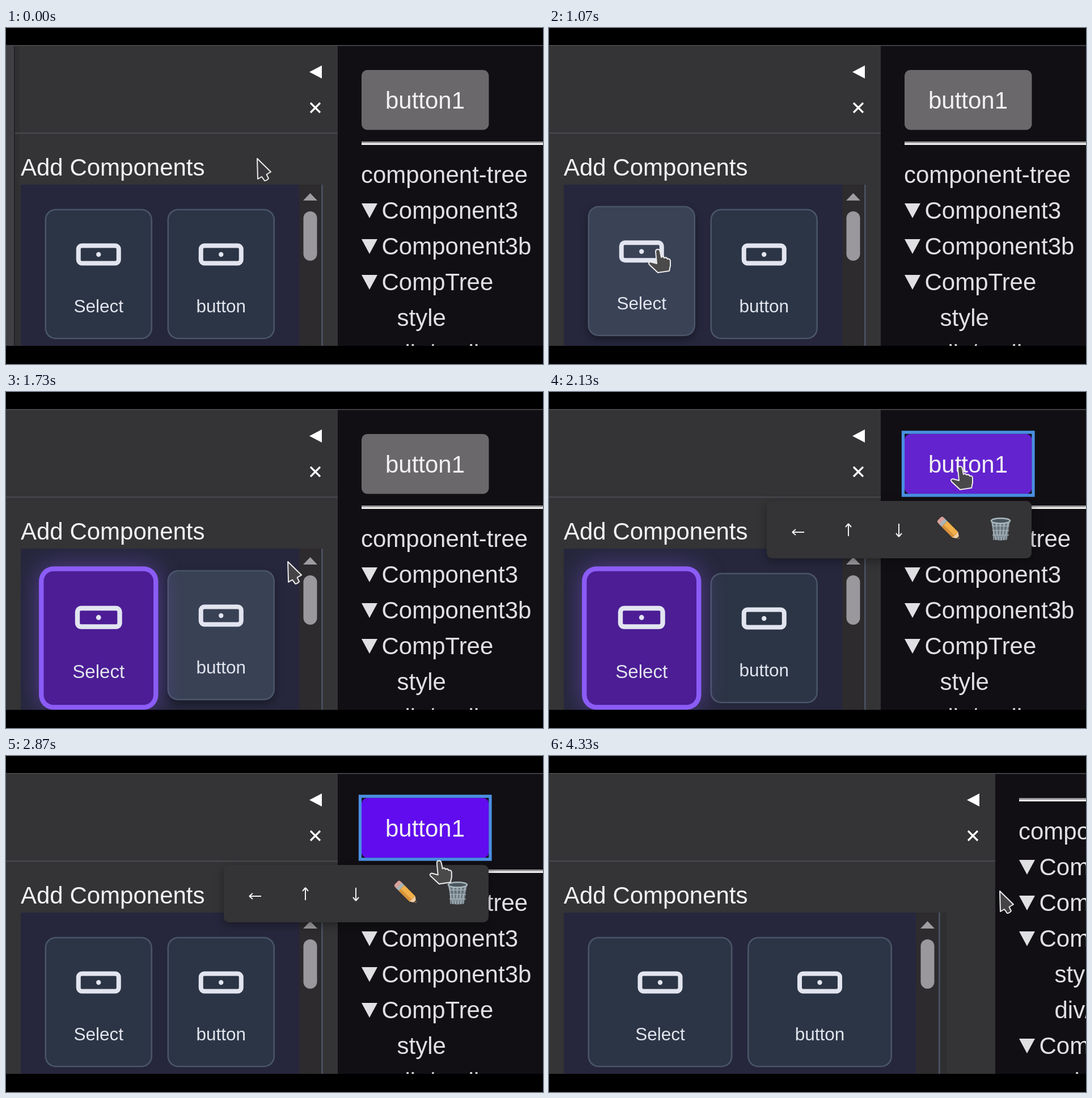
Animation, 947 px wide and 592 px high, one loop 5.74 s. Source, as an HTML page with a canvas:

```html
<!DOCTYPE html>
<html lang="en">
<head>
<meta charset="utf-8">
<title>Component editor</title>
<style>
  html, body { margin: 0; height: 100%; overflow: hidden; background: #000; }
  canvas { display: block; }
</style>
</head>
<body>
<canvas id="stage" width="947" height="592"></canvas>
<script>
const c = document.getElementById('stage').getContext('2d');
const LOOP = 5740, STEP = 1000 / 15;
const SANS = '"Liberation Sans", Arial, sans-serif';

// Pointer path: time, x, y of the tip
const PATH = [
  [600, 443, 230], [1060, 192, 390], [1200, 192, 390], [1730, 497, 299],
  [2060, 724, 132], [2130, 725, 131], [2400, 728, 127], [2600, 730, 130], [3130, 797, 238]
];

const clamp = v => Math.min(1, Math.max(0, v));
const smooth = u => u * u * (3 - 2 * u);
const ramp = (t, from, to) => smooth(clamp((t - from) / (to - from)));
const pulse = (t, a, b, d, e) => ramp(t, a, b) * (1 - ramp(t, d, e));
const mix = (a, b, u) => `rgb(${a.map((v, i) => Math.round(v + (b[i] - v) * u))})`;
const blend = (a, b, u) => a.map((v, i) => v + (b[i] - v) * u);

function rect(x, y, w, h, fill) {
  c.fillStyle = fill;
  c.fillRect(x, y, w, h);
}

function round(x, y, w, h, r, fill, stroke, line) {
  c.beginPath();
  c.roundRect(x, y, w, h, r);
  if (fill) { c.fillStyle = fill; c.fill(); }
  if (stroke) { c.strokeStyle = stroke; c.lineWidth = line; c.stroke(); }
}

function poly(points, fill) {
  c.beginPath();
  points.forEach(([x, y]) => c.lineTo(x, y));
  c.closePath();
  c.fillStyle = fill;
  c.fill();
}

function lines(list, color, width) {
  c.beginPath();
  for (const [x, y, u, v] of list) { c.moveTo(x, y); c.lineTo(u, v); }
  c.strokeStyle = color;
  c.lineWidth = width;
  c.stroke();
}

function text(s, x, y, size, color, align = 'left') {
  c.font = `${size}px ${SANS}`;
  c.textAlign = align;
  c.fillStyle = color;
  c.fillText(s, x, y);
}

function shadow(color, blur, dy = 0) {
  c.shadowColor = color;
  c.shadowBlur = blur;
  c.shadowOffsetY = dy;
}
const noShadow = () => shadow('transparent', 0);

function pointerAt(t) {
  const i = PATH.findIndex(p => p[0] > t);
  if (i === 0) return PATH[0].slice(1);
  if (i < 0) return t < 4000 ? [797, 238] : [795, 238];
  const [a, x, y] = PATH[i - 1], [b, u, v] = PATH[i];
  return blend([x, y], [u, v], ramp(t, a, b));
}

function card(label, x, w, hover, chosen) {
  const fill = blend(blend([44, 53, 69], [58, 66, 86], hover), [76, 29, 149], chosen);
  const h = 229.5, ring = 5.4 * chosen;
  c.save();
  c.translate(x + w / 2, 433.5 - 5.3 * hover * (1 - chosen));
  c.scale(1 + .05 * chosen, 1 + .05 * chosen);
  if (chosen) shadow(`rgba(139,92,246,${.45 * chosen})`, 44);
  else if (hover) shadow(`rgba(0,0,0,${.35 * hover})`, 14, 6);
  const edge = mix([74, 85, 104], [139, 92, 246], Math.min(1, chosen * 1.2));
  round(-w / 2 - ring, -h / 2 - ring, w + 2 * ring, h + 2 * ring, 19 + ring, edge);
  noShadow();
  round(-w / 2 + 2.6, -h / 2 + 2.6, w - 5.2, h - 5.2, 16.5, `rgb(${fill})`);
  round(-35.5, -50, 71, 31, 6, null, '#e2e5f0', 8);
  c.beginPath();
  c.arc(0, -34.5, 4.2, 0, 7);
  c.fillStyle = '#e2e5f0';
  c.fill();
  text(label, 0, 67.5, 31.5, '#e2e5ee', 'center');
  c.restore();
}

function panel(t, wide) {
  const right = 585 + 202 * wide, end = 517 + 131 * wide;
  rect(0, 30, right, 530, '#343335');
  const strip = t < 600;
  if (strip) {
    rect(0, 31, 14, 529, '#403f44');
    rect(14, 31, 2, 529, '#232225');
    rect(16, 31, 8, 529, '#302f31');
  }
  rect(strip ? 16 : 0, 184, right - (strip ? 16 : 0), 2.5, '#47484d');
  poly([[right - 50, 77.5], [right - 28, 66], [right - 28, 89]], '#fff');
  const x = right - 48;
  lines([[x, 132, x + 17, 149], [x + 17, 132, x, 149]], '#fff', 3.2);
  text('Add Components', 26, 259.5, 42, '#f4f4f5');

  rect(26, 276, end - 26, 284, '#26273c');
  rect(end, 276, 39, 284, '#2d2b2e');
  rect(end + 39, 276, 2.7, 284, '#4a5263');
  if (wide) rect(end + 42, 276, 12 * wide, 284, '#2f2e31');
  poly([[end + 7, 304], [end + 32, 304], [end + 19.5, 291]], '#9f9da1');
  round(end + 7.5, 323, 24, 87, 12, '#9a989c');

  c.save();
  c.beginPath();
  c.rect(26, 276, end - 26, 284);
  c.clip();
  const w = (end - 26 - 112) / 2;
  card('button', 95 + w, w, pulse(t, 1420, 1580, 1710, 1880), 0);
  card('Select', 68.5, w, pulse(t, 880, 1050, 1430, 1600), pulse(t, 1200, 1400, 2240, 2460));
  c.restore();
}

function tree(t, wide) {
  const gone = t >= 4000;
  c.save();
  c.beginPath();
  c.rect(585 + 202 * wide, 30, 947, 530);
  c.clip();
  rect(0, 30, 947, 530, '#110f13');
  c.translate(202 * wide, gone ? -126 : 0);
  if (!gone) {
    const rest = blend([107, 104, 107], [107, 110, 122], t > 2500 ? 1 : 0);
    const fill = mix(rest, [96, 12, 240], pulse(t, 1930, 2230, 2850, 3260));
    round(627, 74, 224.5, 105.5, 10, fill);
    if (t >= 1930) round(624.5, 71, 229.5, 111, 0, null, '#4a8fe2', 5.3);
    text('button1', 739, 141.5, 42, '#f1f0f3', 'center');
  }
  rect(627, 200, 500, 3, '#9a999b');
  rect(627, 203, 500, 3, '#f0f0f0');
  const rows = ['component-tree', '>Component3', '>Component3b', '>CompTree',
    '-style', '-div/audio', '>Component4', '-sd'];
  rows.forEach((row, i) => {
    const y = 273 + 63 * i, kind = row[0], color = '#e0dfe2';
    if (kind === '>') poly([[627, y - 27], [655, y - 27], [641, y - 1]], color);
    const x = { '>': 662.5, '-': 689.5 }[kind] || 626;
    text(row.replace(/^[>-]/, ''), x, y, 42, color);
  });
  c.restore();
}

function pencil() {
  c.save();
  c.translate(706, 241);
  c.rotate(Math.PI / 4);
  round(-25, -7, 11, 14, 4, '#d8a09a');
  rect(-18, -7, 6, 14, '#a9b4ba');
  rect(-12, -7, 27, 14, '#f2b04b');
  rect(-12, 2, 27, 5, '#d9923a');
  poly([[15, -7], [25, 0], [15, 7]], '#f0cfa4');
  poly([[21, -2.8], [25, 0], [21, 2.8]], '#5a4a42');
  c.restore();
}

function trash() {
  poly([[780, 228], [813, 228], [808, 260], [796, 262], [785, 260]], '#69757d');
  const mesh = [[784, 252, 809, 252]];
  for (let i = 0; i < 5; i++) {
    mesh.push([781 + 7 * i, 230, 788 + 4.5 * i, 261], [783 + 7 * i, 230, 784 + 4.5 * i, 261]);
  }
  for (let y = 236; y < 260; y += 8) mesh.push([782, y, 811, y]);
  lines(mesh, '#a3b0b8', 1.3);
  c.beginPath();
  c.ellipse(796.5, 227, 16.5, 4.5, 0, 0, 7);
  c.fillStyle = '#4a555c';
  c.fill();
  c.strokeStyle = '#a9b7be';
  c.lineWidth = 2.5;
  c.stroke();
}

function toolbar(t) {
  if (t < 1930 || t >= 4000) return;
  shadow('rgba(0,0,0,.35)', 16, 5);
  round(384, 192, 467, 101, 9, '#343335');
  noShadow();
  const glow = ramp(t, 3000, 3300);
  if (glow) round(757, 203, 78.5, 78.5, 9, mix([52, 51, 53], [87, 88, 94], glow));
  lines([
    [429, 247, 450, 247], [429, 247, 435, 242], [429, 247, 435, 252],
    [528, 232, 528, 254], [528, 232, 523, 238], [528, 232, 533, 238],
    [617, 232, 617, 255], [617, 255, 612, 249], [617, 255, 622, 249]
  ], '#f2f2f2', 2);
  pencil();
  trash();
}

const ARROW = new Path2D('M0 0 L24 23.5 L16.5 28 L20 35 Q17 39 13 39 L8 32 L1 36 Z');
const HAND = new Path2D('M-4 4 Q-4 0 0 0 Q3 0 4 4 L6 14 Q9 11 11 15 Q15 13 17 17 ' +
  'Q22 16 22 21 L22 29 L20 38 L0 41 L-15 27 Q-18 23 -13 22 L-2 25 Z');

function pointer(t) {
  const [x, y] = pointerAt(t);
  const onSelect = x < 258 && y > 319;
  const onButton = x > 285 && x < 474 && y > 319;
  const hand = t < 4000 && (onSelect || onButton || t >= 1930);
  const shape = hand ? HAND : ARROW;
  c.save();
  c.translate(x, y);
  c.lineJoin = 'round';
  c.fillStyle = hand ? '#4b4a4b' : t < 600 ? '#38363a' : '#454346';
  c.fill(shape);
  c.strokeStyle = '#ececec';
  c.lineWidth = 2;
  c.stroke(shape);
  c.restore();
}

function draw(now) {
  const t = Math.floor((now % LOOP) / STEP + .1) * STEP;
  const wide = ramp(t, 3930, 4320);
  rect(0, 0, 947, 592, '#000');
  panel(t, wide);
  tree(t, wide);
  rect(0, 30, 947, 1.6, '#4b4a4d');
  toolbar(t);
  pointer(t);
  rect(0, 560.5, 947, 32, '#000');
}

let start;
function tick(now) {
  start ??= now;
  draw(now - start);
  requestAnimationFrame(tick);
}
draw(0);
requestAnimationFrame(tick);
</script>
</body>
</html>
```
